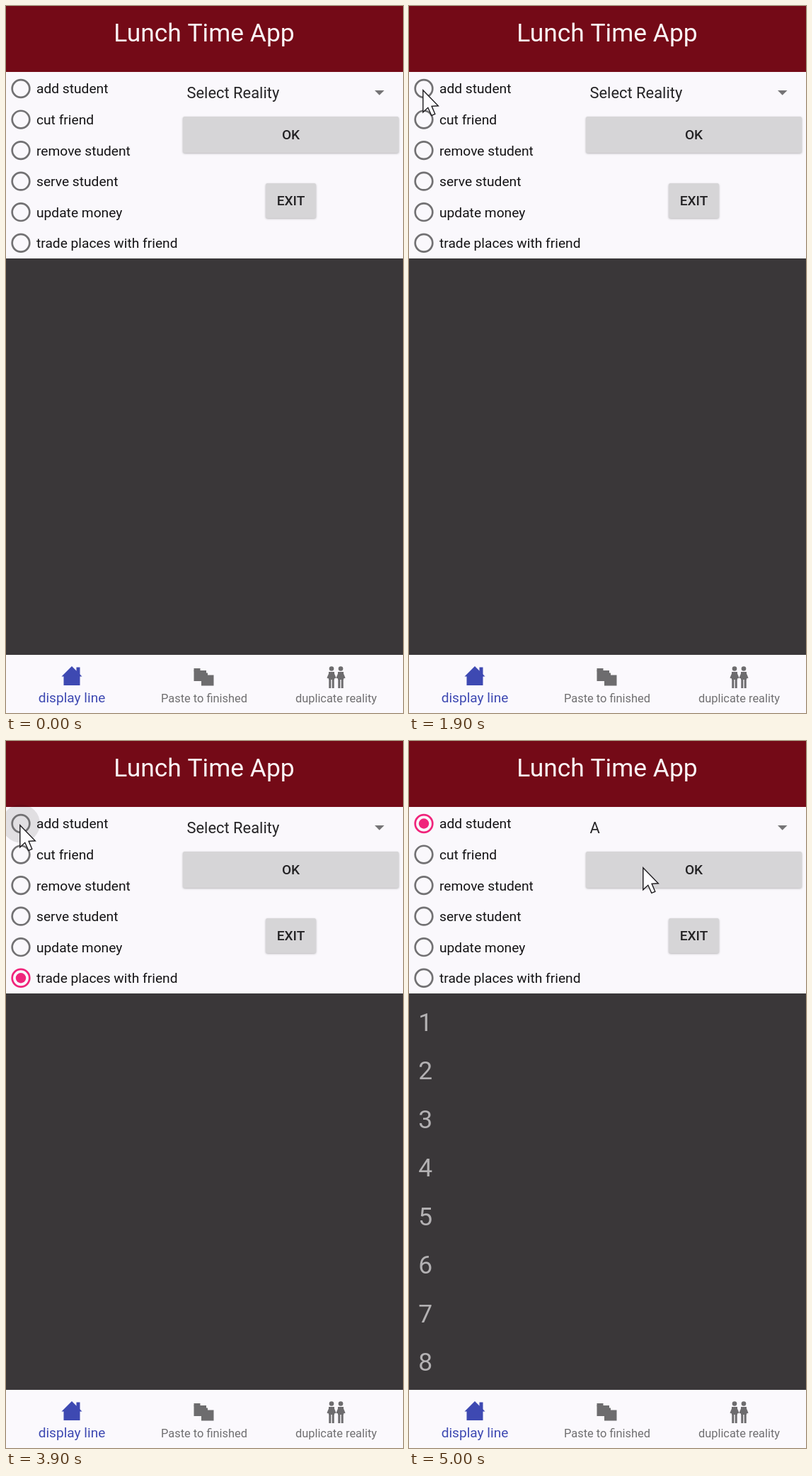
An HTML page with a canvas that plays this animation: 561 px wide and 997 px high, repeating every 5.1 s.

```html
<!DOCTYPE html>
<html lang="en">
<head>
<meta charset="utf-8">
<title>Lunch Time App</title>
<style>
html, body { margin: 0; width: 100%; height: 100%; overflow: hidden; background: #faf8fc; }
canvas { display: block; width: 561px; height: 997px; }
</style>
</head>
<body>
<canvas id="stage" width="561" height="997"></canvas>
<script>
const ctx = document.getElementById('stage').getContext('2d');
const W = 561, H = 997, LOOP = 5100, STEP = 100;
const HEADER = 93, LIST = 356, NAV = 915;
const PAPER = '#faf8fc', GREY = '#727173', ICON = '#6d6c6e', INK = '#252426';
const PINK = '#f0247b', BLUE = '#3e49b2';
const POPUP_OPEN = 4400, PICKED = 4800, LISTED = 4900;

const OPTIONS = ['add student', 'cut friend', 'remove student', 'serve student',
  'update money', 'trade places with friend'];

// When each option is selected
const CHECKED = {
  'add student': [[3100, 3400], [4100, LOOP]],
  'trade places with friend': [[3400, 4100]]
};

const spot = (x, y) => ({ x, y });
const ENTRY = spot(60, 948), ADD = spot(19, 118), TRADE = spot(19, 346);

// Each glide starts where the previous one ended
const GLIDES = [
  { from: 100, to: 400, goal: spot(289, 135) },
  { from: 700, to: 1500, goal: spot(8, 118) },
  { from: 1700, to: 1900, goal: ADD },
  { from: 2700, to: 2800, goal: spot(19, 122) },
  { from: 2900, to: 3200, goal: TRADE },
  { from: 3300, to: 3400, goal: spot(101, 14) },
  { from: 3400, to: 3600, goal: spot(256, 945) },
  { from: 3600, to: 3900, goal: ADD },
  { from: 4100, to: 4300, goal: spot(305, 124) },
  { from: 4400, to: 4600, goal: spot(268, 131) },
  { from: 4700, to: 5000, goal: spot(330, 178) }
];

const ease = k => k < 0.5 ? 2 * k * k : 1 - 2 * (1 - k) ** 2;
const clamp = k => Math.min(1, Math.max(0, k));

function text(str, x, y, size, color, align = 'left', weight = 400) {
  ctx.font = `${weight} ${size}px Roboto, sans-serif`;
  ctx.textAlign = align;
  ctx.fillStyle = color;
  ctx.fillText(str, x, y);
}

function rect(x, y, w, h, color) {
  ctx.fillStyle = color;
  ctx.fillRect(x, y, w, h);
}

function disc(x, y, r, color) {
  ctx.beginPath();
  ctx.arc(x, y, r, 0, Math.PI * 2);
  ctx.fillStyle = color;
  ctx.fill();
}

function ring(x, y, r, width, color) {
  ctx.beginPath();
  ctx.arc(x, y, r, 0, Math.PI * 2);
  ctx.lineWidth = width;
  ctx.strokeStyle = color;
  ctx.stroke();
}

function poly(points, color) {
  ctx.beginPath();
  points.forEach(([x, y]) => ctx.lineTo(x, y));
  ctx.closePath();
  ctx.fillStyle = color;
  ctx.fill();
}

function shadow(alpha, blur, dy, draw) {
  ctx.save();
  ctx.shadowColor = `rgba(0,0,0,${alpha})`;
  ctx.shadowBlur = blur;
  ctx.shadowOffsetY = dy;
  draw();
  ctx.restore();
}

function button(label, x, y, w, h) {
  shadow(0.28, 3, 1, () => {
    ctx.beginPath();
    ctx.roundRect(x, y, w, h, 2.5);
    ctx.fillStyle = '#d6d5d7';
    ctx.fill();
  });
  text(label, x + w / 2, Math.floor(y + h / 2 + 6.7), 19.1, '#232224', 'center', 500);
}

function radio(label, i, t) {
  const x = 21, y = 116.5 + i * 43.55;
  const spans = CHECKED[label] || [];
  const span = spans.find(([on, off]) => t >= on && t < off);
  const closing = spans.some(([, off]) => t >= off && t < off + STEP);
  const pressed = spans.some(([on]) => t >= on - 2 * STEP && t < on);

  if (pressed) disc(x, y, 27, 'rgba(0,0,0,.1)');
  if (closing) ring(x, y, 9.3, 7.6, GREY);
  else ring(x, y, 12.3, 2.7, span ? PINK : GREY);
  if (span) disc(x, y, t - span[0] < STEP ? 8.4 : 7.2, PINK);
  text(label, 43, Math.round(123.3 + i * 43.6), 19.2, '#141315');
}

function home(x, y) {
  poly([[x, y], [x + 14.5, y + 14.5], [x - 14.5, y + 14.5]], BLUE);
  rect(x - 11.5, y + 13, 23, 14, BLUE);
  rect(x + 6.5, y + 1.5, 5, 12, BLUE);
}

function folder(x, y) {
  rect(x, y, 9, 4, ICON);
  rect(x, y + 3, 17.5, 15, ICON);
}

function person(x, y) {
  disc(x, y, 3.3, ICON);
  rect(x - 4, y + 4.5, 8, 11, ICON);
  for (const side of [-1, 1]) {
    poly([[x + side * 3, y + 4.5], [x + side * 6.5, y + 13],
      [x + side * 4.5, y + 14], [x, y + 8]], ICON);
    rect(x + side * 2.2 - 1.5, y + 15, 3, 12.5, ICON);
  }
}

function navBar() {
  rect(0, NAV, W, H - NAV, '#fbf9fd');
  home(93, 931);
  folder(265.5, 934);
  folder(276, 940.5);
  person(460, 934.5);
  person(473, 934.5);
  text('display line', 93, 982, 19.1, BLUE, 'center');
  text('Paste to finished', 280, 982, 16.4, '#706f71', 'center');
  text('duplicate reality', 466.5, 982, 16.4, '#706f71', 'center');
}

function popup() {
  shadow(0.3, 18, 5, () => rect(245.5, 96, 249.5, 86.5, '#f9f8fa'));
  ['Select Reality', 'A', 'B'].forEach((s, i) => text(s, 256, 118 + i * 29, 21.9, INK));
}

function pointerAt(t) {
  let { x, y } = ENTRY;
  for (const { from, to, goal } of GLIDES) {
    const k = ease(clamp((t - from) / (to - from)));
    x += (goal.x - x) * k;
    y += (goal.y - y) * k;
  }
  return { x, y };
}

function pointer({ x, y }) {
  ctx.save();
  ctx.translate(x + 0.8, y + 0.8);
  poly([[0, 0], [0, 31], [7, 24.5], [12, 35.5], [17, 33.5], [12.3, 22.5], [21.5, 22]], '#fdfcfe');
  ctx.lineWidth = 1.4;
  ctx.strokeStyle = '#1c1a1d';
  ctx.stroke();
  ctx.restore();
}

function draw(t) {
  const open = t >= POPUP_OPEN && t < PICKED;
  rect(0, 0, W, H, PAPER);
  rect(0, 0, W, HEADER, '#740a17');
  text('Lunch Time App', 280, 50, 35.4, '#fbf4f6', 'center');

  OPTIONS.forEach((label, i) => radio(label, i, t));

  if (open) rect(250, 104, 305, 37, 'rgba(0,0,0,.03)');
  text(t < PICKED ? 'Select Reality' : 'A', 255.5, 130, 21.9, INK);
  poly([[521, 119], [534.5, 119], [527.7, 125.7]], '#757476');
  button('OK', 250, 156, 305, 51);
  button('EXIT', 367, 250, 71, 49);

  rect(0, LIST, W, NAV - LIST, '#3a3739');
  if (t >= LISTED) {
    for (let n = 1; n <= 8; n++) text(n, 13.3, 340.2 + n * 68.5, 35.4, '#b3b1b3');
  }
  navBar();

  if (open) popup();
  if (t >= GLIDES[0].from) pointer(pointerAt(t));
}

const start = performance.now();
function tick() {
  const t = (performance.now() - start) % LOOP;
  draw(Math.floor(t / STEP) * STEP);
  requestAnimationFrame(tick);
}
tick();
</script>
</body>
</html>
```
